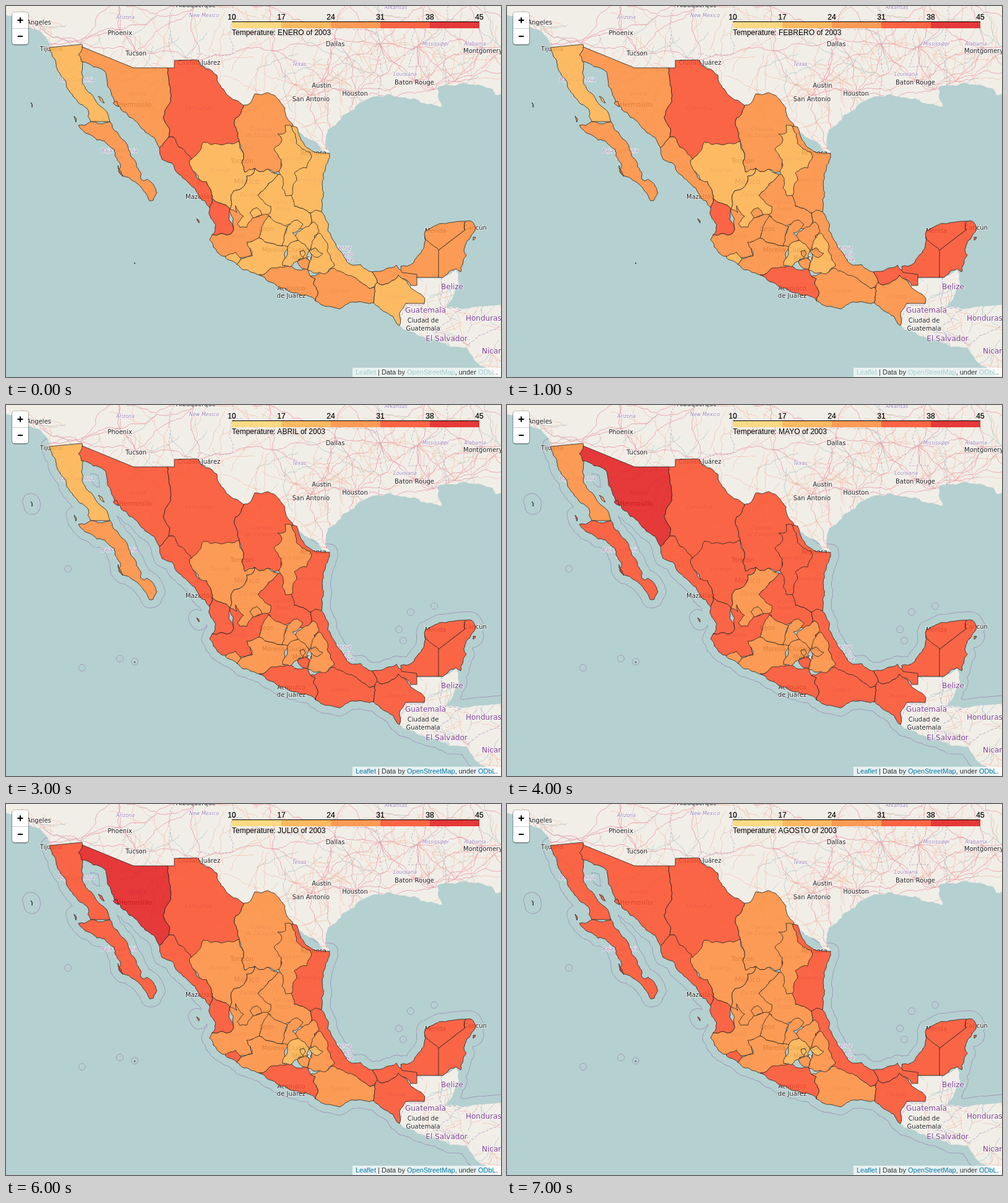
Recreate the animation shown at these times as an HTML page. Size 800x600 px, loop 8000 ms.

```html
<!DOCTYPE html>
<html lang="es">
<head>
<meta charset="utf-8">
<title>Temperature map</title>
<style>
html,body{margin:0;width:100%;height:100%;overflow:hidden;background:#b5d0d0}
svg{display:block;width:800px;height:600px}
.lab{font-family:"DejaVu Sans",sans-serif;text-anchor:middle;paint-order:stroke;stroke:#fff;stroke-opacity:.6;stroke-width:2px;stroke-linejoin:round}
.city{font-size:10px;fill:#222}
.prov{font-size:8px;font-style:italic;fill:#9a85b4}
.land{font-size:12px;fill:#7d4090}
.ui{font-family:"Liberation Sans",Arial,sans-serif}
</style>
</head>
<body>
<svg viewBox="0 0 800 600">
  <defs><clipPath id="dry"></clipPath></defs>
  <rect width="800" height="600" fill="#b5d0d0"/>
  <g id="waters" fill="none" stroke-linejoin="round"></g>
  <g id="ground" fill="#f1eee8"></g>
  <g id="roads" fill="none" clip-path="url(#dry)"></g>
  <g id="labels"></g>
  <g id="states" opacity=".85" stroke="#000" stroke-width=".8" stroke-linejoin="round"></g>
  <g id="legend" class="ui" font-size="12"></g>
  <g id="zoom">
    <rect x="9" y="9" width="28" height="55" rx="5" opacity=".2"/>
    <rect x="9.5" y="10" width="27" height="53" rx="4.5" opacity=".3"/>
    <rect x="10" y="10" width="26" height="52" rx="4" fill="#fff"/>
    <path d="M10 36.5H36" stroke="#ccc"/>
    <path d="M18.5 23H27.5M23 18.5V27.5M19 49H27" stroke="#000" stroke-width="2"/>
  </g>
  <rect x="560" y="585" width="240" height="15" fill="#fff" opacity=".7"/>
  <text class="ui" x="565" y="596" font-size="11" fill="#333"><tspan class="link">Leaflet</tspan> | Data by <tspan class="link">OpenStreetMap</tspan>, under <tspan class="link">ODbL</tspan>.</text>
</svg>
<script>
const NS = 'http://www.w3.org/2000/svg';
const $ = id => document.getElementById(id);
function add(parent, tag, attrs, text) {
  const el = document.createElementNS(NS, tag);
  for (const k in attrs) el.setAttribute(k, attrs[k]);
  if (text) el.textContent = text;
  parent.appendChild(el);
  return el;
}
const COLORS = ['#fed976', '#feb24c', '#fd8d3c', '#fc4e2a', '#e31a1c'];
const MONTHS = ['ENERO', 'FEBRERO', 'MARZO', 'ABRIL', 'MAYO', 'JUNIO', 'JULIO', 'AGOSTO'];
const states = [];

// Midpoint displacement; the same in both directions, so neighbours share edges
function rough([ax, ay], [bx, by], out) {
  const len = Math.hypot(bx - ax, by - ay);
  if (len < 6) { out.push([bx, by]); return; }
  const h = Math.sin((ax + bx) * 12.99 + (ay + by) * 78.23) * 43758;
  const k = (h - Math.floor(h) - .5) * .28 * (ax < bx || ax === bx && ay < by ? 1 : -1);
  const mid = [(ax + bx) / 2 - (by - ay) * k, (ay + by) / 2 + (bx - ax) * k];
  rough([ax, ay], mid, out);
  rough(mid, [bx, by], out);
}
// Closed outline through key points; L marks a straight edge
function outline(keys) {
  const list = keys.split(' ').map(s => ({straight: s[0] === 'L', p: s.replace('L', '').split(',').map(Number)}));
  const out = [];
  list.forEach(({straight, p}, i) => {
    const prev = list.at(i - 1).p;
    if (straight) out.push(p); else rough(prev, p, out);
  });
  return 'M' + out.map(p => p.map(v => v.toFixed(1))).join('L') + 'Z';
}
function ground(d, zone = true) {
  add($('ground'), 'path', {d});
  add($('dry'), 'path', {d});
  if (zone) add($('waters'), 'path', {d, class: 'zone', stroke: '#9a86b8', 'stroke-width': 27});
}
// levels: one colour class per month
function state(levels, ...parts) {
  parts.map(outline).forEach(d => {
    ground(d);
    states.push({levels, el: add($('states'), 'path', {d})});
  });
}

ground(outline('L0,0 L800,0 L800,142 791,144 784,133 750,127 725,129 698,131 698,147 705,163 688,158 672,157 660,149 640,148 599,146 577,155 545,176 520,200 517,215 523,238 470,200 447,166 423,140 402,142 390,160 371,152 353,137 341,112 L309,87 L272,88 L272,100 L206,100 L123,66 L123,62 L70,67 62,48 42,36 0,14'), false);
ground(outline('L664,440 L706,440 728,425 731,434 723,468 712,488 740,490 770,486 L800,483 L800,599 775,584 750,562 744,552 690,540 650,525 636,517 L620,470'));

state('11112233', '70,67 L123,62 122,87 122,108 131,137 150,160 165,176 168,187 L137,187 133,169 109,147 99,133 87,109 79,86', '149,146 155,149 159,157');
state('22223333', '168,187 180,204 187,215 197,227 201,241 215,266 218,280 223,283 228,280 244,302 238,314 232,315 226,303 212,287 193,276 182,268 184,254 175,232 159,218 147,217 133,207 124,201 117,193 127,193 L137,187', '110,178 114,183 113,188', '181,258 186,268 189,276');
state('22234443', '123,66 L206,100 L261,100 265,130 262,161 254,180 264,198 263,212 248,229 243,220 219,198 199,180 186,168 170,140 163,118 160,106 150,100 133,93 122,90 117,79', '173,157 179,154 182,163');
state('33333333', '261,100 L272,100 L272,88 L309,87 341,112 353,137 371,152 384,161 371,181 369,192 377,220 360,240 316,240 304,250 290,240 271,212 263,212 264,198 254,180 262,161 265,130');
state('22333222', '384,161 390,160 402,142 423,140 442,153 453,179 463,191 464,260 434,270 424,264 409,268 402,262 386,269 381,254 384,239 377,220 369,192 371,181');
state('12233333', '462,194 470,196 477,217 490,231 523,238 516,264 511,289 510,314 510,333 492,335 466,324 450,295 452,225');
state('12233322', '440,272 450,276 458,304 466,324 492,335 494,350 488,362 440,356 424,344 420,325 407,306 424,287');
state('11223222', '451,193 460,193 468,207 469,222 491,236 494,243 486,262 476,263 466,270 470,281 462,306 452,307 446,294 448,283 441,268 446,257 440,242 433,231 446,216 439,207 452,204');
state('32333333', '248,229 263,212 271,212 279,228 297,243 302,264 311,281 324,284 333,311 329,326 312,309 293,284 279,272 268,254 252,248');
state('11223322', '316,226 319,220 345,224 377,219 384,239 381,254 386,269 402,263 399,272 389,275 389,283 377,297 368,299 362,328 333,311 324,284 313,281 297,257 297,249 309,239');
state('22233222', '362,328 367,318 398,328 428,341 412,367 410,375 392,384 398,404 379,407 357,406 345,401 335,390 329,378 333,370 346,368 364,368 368,361');
state('33333333', '333,311 362,328 360,345 368,361 364,368 346,368 333,370 339,354 330,340 329,326', '308,344 312,347 312,351');
state('11222222', '402,263 409,268 424,264 440,272 424,287 407,306 428,324 427,335 398,343 389,358 378,358 374,352 384,340 371,323 373,334 362,328 368,299 377,297 389,283 389,275 399,272');
state('12222222', '394,334 405,326 414,338 400,343');
state('12222222', '424,339 441,351 456,358 450,370 453,384 446,388 430,384 409,375 412,365');
state('12222222', '389,382 409,375 430,384 446,388 462,384 450,410 452,424 428,424 409,435 385,427 373,418 380,409 398,404');
state('11122333', '354,406 371,398 380,409 373,418 361,411');
state('23333333', '409,435 428,424 443,422 461,421 488,426 492,437 500,441 497,450 504,461 500,477 479,468 461,463 441,455 425,446');
state('12233333', '492,335 500,330 510,333 519,349 520,364 527,376 533,385 541,397 547,407 555,417 573,418 585,428 592,430 600,447 588,457 565,442 540,440 515,415 499,371 494,350');
state('22333222', '492,437 505,433 530,424 542,430 554,436 566,440 588,457 596,455 594,480 568,479 539,490 509,483 500,477 504,461 497,450 500,441');
state('12222222', '455,390 463,384 468,372 479,361 497,349 506,364 498,372 501,381 490,395 475,392');
state('12222222', '446,388 450,370 455,356 471,346 480,353 463,367 472,379 462,386');
state('11222222', '500,374 507,367 519,383 519,395 524,403 531,420 516,433 497,432 487,427 494,404');
state('12222111', '490,396 500,391 512,400 503,407');
state('11122111', '456,388 473,379 490,395 485,410 474,409 459,422 447,420 455,402');
state('12222111', '475,397 481,395 484,401 480,407');
state('22333222', '471,413 484,407 491,413 488,426 478,424');
state('12233333', '596,455 600,447 607,451 620,447 634,435 650,450 654,456 671,466 L677,473 L676,481 L646,481 636,497 636,517 609,493 594,480');
state('23333333', '638,421 648,421 659,415 671,399 676,385 677,372 L702,390 L699,439 L664,439 663,450 640,435');
state('23333333', '592,430 614,425 631,419 640,431 L664,434 L664,452 L654,452 647,443 634,435 620,447 607,451 600,447');
state('23333333', '677,374 678,363 694,355 721,350 743,348 742,362 L699,395 690,387');
state('23333333', '743,348 752,348 759,358 752,371 744,382 740,394 744,403 738,418 735,430 727,425 714,433 L706,439 L699,439 L699,395 L742,362', '755,374 759,374 755,379');
state('11112233', '40,156 42,158 42,164');

// Sea fill leaves only the outer edge of each wide stroke
[...$('waters').children].forEach(p => add($('waters'), 'path', {d: p.getAttribute('d'), stroke: '#b5d0d0', 'stroke-width': 25.6}));
[[100, 265], [123, 425], [184, 410], [208, 415], [635, 363], [654, 335], [692, 325], [642, 381]]
  .forEach(([cx, cy]) => add($('waters'), 'circle', {cx, cy, r: 5.5, class: 'zone', stroke: '#9a86b8', 'stroke-width': .7}));
add($('ground'), 'circle', {cx: 208, cy: 416, r: 1.2, fill: '#555'});

let seed = 7;
const rnd = () => (seed = (seed * 16807) % 2147483647) / 2147483647;
const TEAL = '#94bcc0', SALMON = '#f3b49c', PINK = '#e88fa0', MAUVE = '#a491b8';
function line(stops, stroke, width = .8, dash = 'none') {
  const out = [stops[0]];
  stops.slice(1).forEach((p, i) => rough(stops[i], p, out));
  add($('roads'), 'path', {d: 'M' + out.map(p => p.map(v => v.toFixed(1))).join('L'), stroke, 'stroke-width': width, 'stroke-dasharray': dash, opacity: .75});
}
function scatter(count, x, y, w, h, len, color) {
  for (let i = 0; i < count; i++) {
    let px = x + rnd() * w, py = y + rnd() * h, a = rnd() * 6.3;
    const stops = [];
    for (let k = 0; k < 4; k++) {
      stops.push([px, py]);
      px += Math.cos(a) * len; py += Math.sin(a) * len; a += (rnd() - .5) * .9;
    }
    line(stops, color);
  }
}
scatter(34, 0, 0, 800, 150, 24, TEAL);
scatter(20, 660, 440, 140, 140, 13, TEAL);
scatter(34, 0, 0, 420, 130, 22, SALMON);
scatter(95, 400, 0, 400, 160, 24, SALMON);
scatter(18, 440, 110, 130, 110, 18, SALMON);
scatter(60, 640, 450, 160, 150, 10, SALMON);
scatter(60, 240, 110, 330, 360, 20, SALMON);

// Highways join neighbouring towns
const towns = [[40, 22], [68, 62], [120, 60], [185, 38], [180, -5], [210, 75], [310, 90], [307, 0], [430, 72], [425, 0], [532, 52], [550, -5], [510, 122], [492, 145], [565, 140], [518, 232], [605, 62], [660, 122], [692, 135], [665, 66], [680, -5], [725, 122], [770, 68], [750, -5], [830, 50], [830, 115]];
towns.forEach((a, i) => towns.slice(i + 1).forEach(b => {
  if (Math.hypot(a[0] - b[0], a[1] - b[1]) < 128) line([a, b], PINK, 1);
}));
[[[272, 0], [272, 88]], [[309, 77], [366, 77], [366, 0]], [[600, 0], [600, 72], [603, 148]], [[366, 20], [500, 38], [600, 46]], [[660, 35], [650, 98], [682, 99], [682, 132]], [[715, 0], [716, 126]]]
  .forEach(s => line(s, MAUVE, .8, '4 2'));
[[[704, 438], [704, 487], [735, 492]], [[735, 492], [694, 528], [748, 550], [800, 515]], [[677, 481], [646, 481], [636, 516]]]
  .forEach(s => line(s, MAUVE, 1, '5 2'));

// Rows of x:baseline:text[:anchor]
const labels = (kind, rows) => rows.split('|').forEach(r => {
  const [x, y, text, anchor = 'middle'] = r.split(':');
  add($('labels'), 'text', {class: 'lab ' + kind, x, y, style: 'text-anchor:' + anchor}, text);
});
labels('prov', '193:21:Arizona|320:18:New Mexico|474:97:Texas|645:113:Louisiana|694:64:Mississippi|758:64:Alabama|630:5:Arkansas|114:122:Baja California|212:145:Sonora|311:168:Chihuahua|412:202:Coahuila|412:212:de Zaragoza|183:237:Baja California|183:247:Sur|459:250:Nuevo León|346:268:Durango|490:284:Tamaulipas|398:308:Zacatecas|448:320:San Luis|448:331:Potosí|375:375:Jalisco|540:394:Veracruz|540:404:de Ignacio|540:413:de la Llave|540:463:Oaxaca|630:473:Chiapas');
labels('city', '73:30:Los Angeles:end|184:47:Phoenix|210:80:Tucson|73:73:Tijuana|312:95:Ciudad Juárez|307:2:Albuquerque|532:65:Dallas|510:132:Austin|493:154:San Antonio|564:145:Houston|660:127:Baton Rouge|739:76:Montgomery:start|209:163:Hermosillo|381:254:Torreón|290:312:Mazatlán:start|518:241:Reynosa:end|421:364:León|432:398:Morelia|480:398:Ciudad de|480:411:México|461:460:Acapulco|461:472:de Juárez|694:367:Mérida|758:362:Cancún|674:512:Ciudad de|674:525:Guatemala');
labels('land', '678:496:Guatemala|721:458:Belize|743:509:Honduras:start|712:542:El Salvador|769:562:Nicaragua:start|389:288:México');

COLORS.forEach((fill, i) => add($('legend'), 'rect', {x: 365 + i * 80, y: 26, width: 80, height: 10, fill, opacity: .85}));
add($('legend'), 'path', {d: 'M365 25.5H765', stroke: '#000'});
for (let i = 0; i < 6; i++) {
  add($('legend'), 'text', {x: 365 + i * 80, y: 22, 'text-anchor': 'middle', stroke: '#000', 'stroke-width': .2}, 10 + i * 7);
}
const caption = add($('legend'), 'text', {x: 365, y: 47});
const zones = document.querySelectorAll('.zone');
const links = document.querySelectorAll('.link');

let month = -1, start;
function show(m) {
  if (m === month) return;
  month = m;
  states.forEach(s => s.el.setAttribute('fill', COLORS[s.levels[m]]));
  caption.textContent = `Temperature: ${MONTHS[m]} of 2003`;
  const sharp = m > 2;
  zones.forEach(z => z.style.visibility = sharp ? 'visible' : 'hidden');
  links.forEach(l => l.style.fill = sharp ? '#0078a8' : '#a3cdd0');
}
function tick(now) {
  start ??= now;
  show(Math.floor((now - start) % 8000 / 1000));
  requestAnimationFrame(tick);
}
show(0);
requestAnimationFrame(tick);
</script>
</body>
</html>
```
